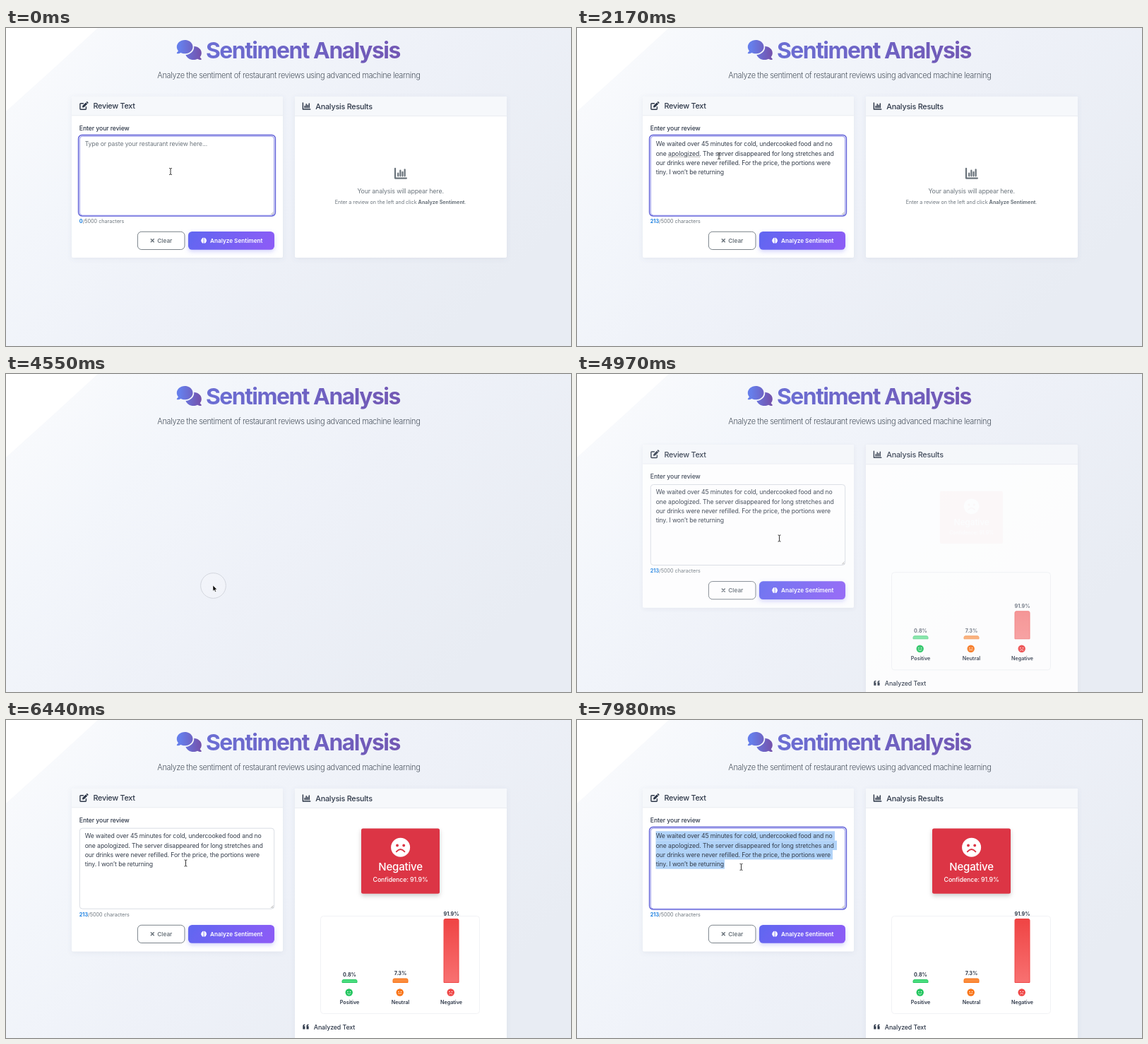
These frames come from a looping animation (800x450 px, 8000 ms). An HTML page:

```html
<!DOCTYPE html>
<html lang="en">
<head>
<meta charset="utf-8">
<title>Sentiment Analysis</title>
<style>
html,body{margin:0;width:100%;height:100%;overflow:hidden;background:#f2f5fa}
svg{display:block;width:100vw;height:100vh;font-family:Inter,"Open Sans",sans-serif}
</style>
</head>
<body>
<svg id="stage" viewBox="0 0 800 450" xmlns="http://www.w3.org/2000/svg"></svg>
<script>
const INK = '#2d3748', GREY = '#6c757d', LOOP = 8000;
const stage = document.getElementById('stage');

// Text is placed by the middle of its capital letters.
function text(x, mid, size, str, o = {}) {
  const { w = 400, fill = INK, ls = -0.012, anchor = 'start', id = '' } = o;
  return `<text ${id && `id="${id}"`} x="${x}" y="${mid + size * 0.364}" font-size="${size}" font-weight="${w}"
    fill="${fill}" letter-spacing="${ls}em" text-anchor="${anchor}" xml:space="preserve">${str}</text>`;
}
const rect = (x, y, w, h, r, rest) =>
  `<rect x="${x}" y="${y}" width="${w}" height="${h}" rx="${r}" ${rest}/>`;
const group = (id, body) => `<g id="${id}">${body}</g>`;
const gradient = (id, x1, y1, x2, y2, stops) =>
  `<linearGradient id="${id}" gradientUnits="userSpaceOnUse" x1="${x1}" y1="${y1}" x2="${x2}" y2="${y2}">` +
  stops.map(([at, c]) => `<stop offset="${at}" stop-color="${c}"/>`).join('') + '</linearGradient>';
const shadow = (id, dy, blur, color, alpha) =>
  `<filter id="${id}" x="-20%" y="-30%" width="140%" height="180%"><feDropShadow dx="0" dy="${dy}"
    stdDeviation="${blur}" flood-color="${color}" flood-opacity="${alpha}"/></filter>`;

// Face: mood 1 smiles, 0 is flat, -1 frowns.
function face(x, y, r, fill, ink, mood) {
  const m = mood < 0 ? 0.45 : 0.3, bend = m + mood * 0.48;
  return `<g transform="translate(${x} ${y}) scale(${r})"><circle r="1" fill="${fill}"/>
    <circle cx="-.34" cy="-.2" r=".14" fill="${ink}"/><circle cx=".34" cy="-.2" r=".14" fill="${ink}"/>
    <path d="M-.43 ${m}Q0 ${bend} .43 ${m}" fill="none" stroke="${ink}" stroke-width=".14" stroke-linecap="round"/></g>`;
}
const chartIcon = (x, y, s, c) =>
  `<path transform="translate(${x} ${y}) scale(${s})" d="M.8 0V9.2H11.4M3.6 7V4.6M5.7 7V1.8M7.8 7V3.4M9.9 7V1"
    fill="none" stroke="${c}" stroke-width="1.5" stroke-linecap="round" stroke-linejoin="round"/>`;
const quote = x =>
  `<path d="M${x} 433.2q0-2.7 3-2.7v1.3q-1.4 0-1.5 1.5h1.6v4.2h-3.1z" fill="${INK}"/>`;

const defs = `<defs>
  ${gradient('sky', 90, -90, 620, 440, [[0, '#fff'], [.03, '#fafbfd'], [.3, '#f3f6fb'], [.6, '#eef1f8'], [1, '#e8ecf3']])}
  ${gradient('brand', 93, 0, 709, 0, [[0, '#667eea'], [1, '#764ba2']])}
  ${gradient('button', 275, 275, 363, 327, [[0, '#6366f1'], [1, '#8b5cf6']])}
  ${gradient('red', 0, 281, 0, 372, [[0, '#ef4444'], [1, '#f87171']])}
  ${shadow('soft', 1.5, 3, '#5a6a8a', .1)}
  ${shadow('glow', 2.5, 3, '#6366f1', .3)}
  ${shadow('lift', 3, 3, '#000', .2)}
</defs>`;

const backdrop = rect(0, 0, 800, 450, 0, 'fill="url(#sky)"') +
  '<path d="M0 0H130Q65 60 0 118z" fill="#fff"/>';

const bubbles = `<g fill="url(#brand)"><g transform="translate(241.8 17) scale(.0547)">
  <path d="M208 352c115 0 208-79 208-176S323 0 208 0 0 79 0 176c0 39 15 74 40 103-8 20-19 32-32 43-15 12-8 30 8 30 32 0 62-10 87-24 31 15 67 24 105 24z"/>
  <path d="M448 176c0 112-99 197-216 207 24 74 104 129 200 129 38 0 74-9 105-24 25 14 55 24 87 24 16 0 23-18 8-30-13-11-24-23-32-43 25-29 40-64 40-103 0-88-77-161-194-174 1 5 2 9 2 14z"/></g></g>`;
const header = bubbles +
  text(283, 31.3, 31.8, 'Sentiment Analysis', { w: 700, fill: 'url(#brand)', ls: -0.046 }) +
  text(400.4, 67, 11, 'Analyze the sentiment of restaurant reviews using advanced machine learning',
    { w: 300, fill: '#4c5560', ls: -0.033, anchor: 'middle' });

const cardHead = (x, y, w, h) => rect(x, y, w, h, 1.5, 'fill="#f6f8fb"') +
  `<path d="M${x} ${y + h}h${w}" stroke="#e6e9ef" stroke-width=".8"/>`;

const lines = ['We waited over 45 minutes for cold, undercooked food and no',
  'one apologized. The server disappeared for long stretches and',
  'our drinks were never refilled. For the price, the portions were',
  'tiny. I won’t be returning'];
const lineEnd = [365, 368, 362, 209];
const lineMid = i => 164 + i * 13.35;

const leftCard = group('left',
  rect(93, 97, 299, 228, 2, 'id="leftBox" fill="#fff" filter="url(#soft)"') + cardHead(93, 97, 299, 26.8) +
  `<path d="M109.5 106.7H105.8Q104.9 106.7 104.9 107.6V114.3Q104.9 115.2 105.8 115.2H112.5Q113.4 115.2 113.4 114.3V111.7"
     fill="none" stroke="${INK}" stroke-width="1.4" stroke-linecap="round"/>
   <path d="M108 112.6l.3-2.5 4.7-4.7 2.2 2.2-4.7 4.7zM113.5 104.9l.6-.6q.6-.5 1.2 0l1 1q.5.6 0 1.2l-.6.6z" fill="${INK}"/>` +
  text(123.5, 110.4, 10.8, 'Review Text', { w: 500, ls: -0.025 }) +
  text(103.8, 141.8, 8.7, 'Enter your review', { w: 500 }) +
  rect(102.5, 151.5, 279, 115.5, 5, 'id="ring" fill="none" stroke="#5b5bd6" stroke-width="1.3"') +
  rect(104.3, 153.2, 275.4, 112, 4, 'id="area" fill="#fff" stroke-width="1"') +
  '<path id="grip" d="M375.2 264l3.4-3.4M377.3 264l1.3-1.3" stroke="#777" stroke-width=".6"/>' +
  group('marks', lineEnd.map((e, i) => rect(111.5, lineMid(i) - 6.7, e - 111.5, 13.4, 0, 'fill="#b1d3f8"')).join('')) +
  text(111.7, 164, 8.65, 'Type or paste your restaurant review here...', { id: 'hint', fill: GREY }) +
  group('review', lines.map((s, i) => text(111.7, lineMid(i), 8.7, s, { fill: '#343d4b' })).join('')) +
  '<path id="spell" d="M129 182.3H174" stroke="#777" stroke-width="1" stroke-dasharray="1 1"/>' +
  rect(111.5, 158.5, .9, 10.5, 0, 'id="caret" fill="#222"') +
  group('foot',
    `<text id="count" x="103.8" y="276.1" font-size="7.2" fill="${GREY}"><tspan id="num" fill="#1a7fe0" font-weight="700">0</tspan>/5000 characters</text>` +
    rect(186.4, 288.3, 66.6, 25.2, 5.5, `fill="#fff" stroke="${GREY}" stroke-width=".9"`) +
    `<path d="M205.3 298.8l4 4m0-4l-4 4" stroke="${GREY}" stroke-width="1.5" stroke-linecap="round"/>` +
    text(214.3, 301, 8.2, 'Clear', { w: 600, fill: GREY, ls: 0 }) +
    rect(258, 288, 122, 25.8, 5.5, 'fill="url(#button)" filter="url(#glow)"') +
    `<path d="M279.7 296.8q-1.6-.4-2 1.2-1.5.6-1.2 2-1 1.4.3 2.5.1 1.8 1.7 1.9 1.2.8 1.2-.6zM280.5 296.8q1.6-.4 2 1.2 1.5.6 1.2 2 1 1.4-.3 2.5-.1 1.8-1.7 1.9-1.2.8-1.2-.6z" fill="#fff"/>` +
    text(289, 301, 8.2, 'Analyze Sentiment', { w: 600, fill: '#fff', ls: 0 })));

const MID = 558.6;
const empty = group('empty',
  chartIcon(549.8, 198.8, 1.5, GREY) +
  text(MID, 230.5, 8.8, 'Your analysis will appear here.', { fill: GREY, anchor: 'middle', ls: -0.015 }) +
  text(MID, 246.8, 7.15, 'Enter a review on the left and click <tspan font-weight="700">Analyze Sentiment</tspan>.',
    { fill: GREY, anchor: 'middle', ls: 0 }));

const bars = [
  { x: 486.5, h: 5, name: 'Positive', pct: '0.8%', fill: '#4ade80', edge: '#22c55e', mood: 1 },
  { x: 558.5, h: 6.5, name: 'Neutral', pct: '7.3%', fill: '#fb8c3c', edge: '#f97316', mood: 0 },
  { x: 630.5, h: 91, name: 'Negative', pct: '91.9%', fill: 'url(#red)', edge: '#ef4444', mood: -1 }];
const BASE = 372;

const result = group('result',
  group('badge', rect(503, 153.5, 111, 92.3, 2.5, 'fill="#dc3545" filter="url(#lift)"') +
    face(MID, 180.2, 13.5, '#fff', '#dc3545', -1) +
    text(MID, 208, 15, 'Negative', { w: 500, fill: '#fff', anchor: 'middle' }) +
    text(MID, 226.2, 8.8, 'Confidence: 91.9%', { w: 500, fill: '#fff', anchor: 'middle' })) +
  rect(445.5, 277.5, 225, 138, 4, 'fill="none" stroke="#f0f1f4" stroke-width=".9"') +
  bars.map((b, i) =>
    `<path id="bar${i}" fill="${b.fill}" stroke="${b.edge}" stroke-width="1"/>` +
    text(b.x, 0, 7.2, b.pct, { w: 700, anchor: 'middle', ls: 0, id: 'pct' + i }) +
    face(b.x - .8, 385.5, 5.2, b.edge, '#fff', b.mood) +
    text(b.x, 399, 7.2, b.name, { w: 600, anchor: 'middle', ls: 0 })).join('') +
  quote(420.3) + quote(425.5) +
  text(435.8, 434.4, 8.8, 'Analyzed Text', { w: 500 }));

const rightCard = group('right',
  rect(409, 97, 300, 228, 2, 'id="rightBox" fill="#fff" filter="url(#soft)"') + cardHead(409, 97, 300, 27.5) +
  chartIcon(419.6, 106, .98, INK) + text(438.3, 111.1, 10.8, 'Analysis Results', { w: 500, ls: -0.022 }) + empty + result);

const pointers = '<circle id="ripple" fill="#fff" fill-opacity=".25" stroke="#b9bcc4" stroke-width=".8"/>' +
  group('arrow', '<path d="M0 0V8.2L1.9 6.5 3.2 9.3 4.5 8.7 3.2 6H5.7z" fill="#000" stroke="#fff" stroke-width=".6"/>') +
  group('beam', '<path d="M-1.9-4.6Q0-4.6 0-3.3 0-4.6 1.9-4.6M0-3.3V3.3M-1.9 4.6Q0 4.6 0 3.3 0 4.6 1.9 4.6" fill="none" stroke="#333" stroke-width="1"/>');

stage.innerHTML = defs + backdrop + header + leftCard + rightCard + pointers;

const el = {};
stage.querySelectorAll('[id]').forEach(n => { el[n.id] = n; });
const set = (id, o) => { for (const k in o) el[id].setAttribute(k, o[k]); };
const show = (id, on) => set(id, { visibility: on ? 'inherit' : 'hidden' });
const part = (t, from, dur) => Math.min(1, Math.max(0, (t - from) / dur));
const easeOut = p => 1 - (1 - p) ** 2;
const smooth = p => p * p * (3 - 2 * p);
const within = (t, a, b) => t >= a && t < b;

// Timeline in ms.
const PASTE = 1470, CLICK = 4340, LEAVE = 4480, ENTER = 4580, FOCUS = 6860, SELECT = 7280;
const route = [[0, 233, 203], [1500, 233, 203], [2100, 201, 181], [2700, 201, 181], [3080, 281, 252],
  [3500, 295.5, 277], [3700, 295.5, 277], [3990, 293, 299], [4600, 293, 299],
  [4970, 286.5, 232.5], [5600, 254.5, 202.5], [6540, 254.5, 202.5], [6850, 232.5, 208], [LOOP, 232.5, 208]];

function pointerAt(t) {
  const i = Math.max(1, route.findIndex(k => k[0] > t));
  const [a, b] = [route[i - 1], route[i]], p = smooth(part(t, a[0], b[0] - a[0]));
  return [a[1] + (b[1] - a[1]) * p, a[2] + (b[2] - a[2]) * p];
}

function draw(t) {
  const done = t >= LEAVE, typed = t >= PASTE, grow = done ? 2 : 0;
  const enter = done ? easeOut(part(t, ENTER, 600)) : 1;
  for (const side of ['left', 'right'])
    set(side, { opacity: enter, transform: `translate(0 ${(1 - enter) * 27})` });

  const focus = done ? part(t, FOCUS, 150) : 1;
  set('leftBox', { height: 228 + grow * 1.2 });
  set('rightBox', { height: done ? 400 : 228 });
  set('area', { height: 112 + grow, stroke: focus > .5 ? '#8b8ce8' : '#d9dde4' });
  set('ring', { height: 114.5 + grow, opacity: focus });
  set('grip', { transform: `translate(0 ${grow})` });
  set('foot', { transform: `translate(0 ${grow})` });

  show('hint', !typed);
  show('review', typed);
  show('spell', typed && !done);
  show('marks', t >= SELECT);
  el.num.textContent = typed ? 213 : 0;
  show('caret', within(t, 560, 980) || within(t, PASTE, 1960) || within(t, 2520, 3010));
  set('caret', { transform: typed ? 'translate(97.5 40)' : '' });

  show('empty', !done);
  show('result', done);
  const pop = smooth(part(t, 4920, 560)), s = .8 + .2 * pop;
  set('badge', { opacity: pop, transform: `translate(${MID} 199.7) scale(${s}) translate(${-MID} -199.7)` });
  const rise = easeOut(part(t, 4750, 880));
  bars.forEach((b, i) => {
    const h = Math.max(5, b.h * rise), top = BASE - h + .5;
    set('bar' + i, {
      d: `M${b.x - 10.5} ${BASE - .5}V${top + 2}q0-2 2-2h17q2 0 2 2V${BASE - .5}z`,
      opacity: .5 + .5 * rise
    });
    set('pct' + i, { y: top - 4.6, opacity: .5 + .5 * rise });
  });

  const [x, y] = pointerAt(t), beam = y < 265 && !within(t, LEAVE, 4700);
  show('beam', beam);
  show('arrow', !beam);
  set(beam ? 'beam' : 'arrow', { transform: `translate(${x} ${y})` });
  const wave = part(t, CLICK, 300);
  show('ripple', within(t, CLICK, CLICK + 300));
  set('ripple', { cx: 293.5, cy: 299.5, r: 6 + 13 * easeOut(wave), opacity: 1 - wave * .5 });
}

function tick() {
  draw(performance.now() % LOOP);
  requestAnimationFrame(tick);
}
tick();
</script>
</body>
</html>
```
